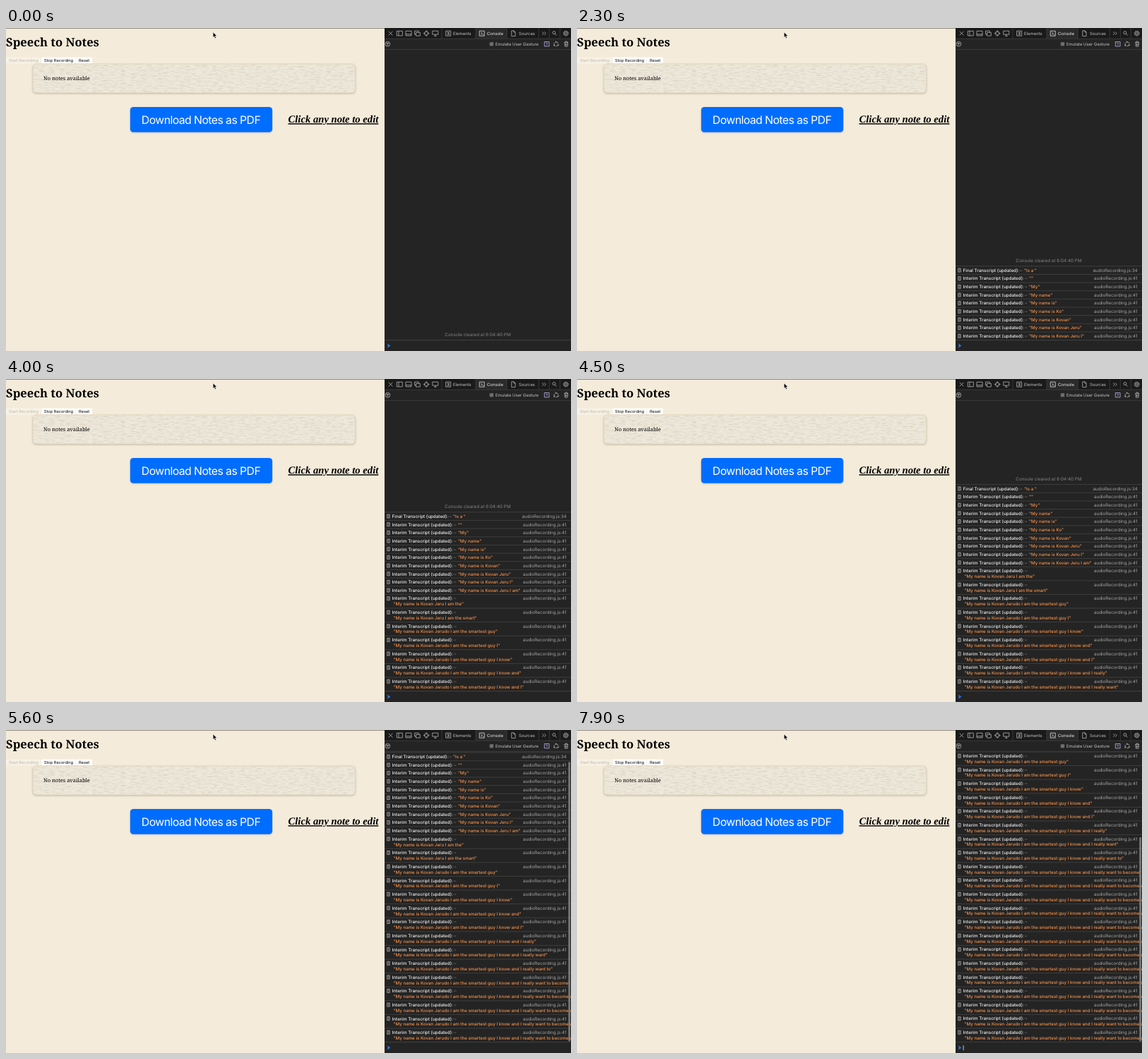
These frames come from a looping animation (800x458 px, 8000 ms). An HTML page:

```html
<!DOCTYPE html>
<html lang="en">
<head>
<meta charset="utf-8">
<title>Speech to Notes</title>
<style>
  html, body { margin: 0; width: 100%; height: 100%; overflow: hidden; background: #f4ebda; }
  svg { display: block; width: 100vw; height: 100vh; }
  text { font-family: Inter, "Liberation Sans", sans-serif; text-rendering: geometricPrecision; white-space: pre; }
  .serif { font-family: "Noto Serif", serif; }
  .hint {
    font: italic bold 14.67px "Liberation Serif", serif;
    text-decoration: underline 1px; text-underline-offset: 1px;
  }
  .btn { font-size: 5.7px; text-anchor: middle; }
  .tab { font-size: 5.95px; fill: #c4c4c4; }
  .row { font-size: 6.3px; fill: #f2f2f2; }
  .label { font-weight: 500; }
  .dash { fill: #999; }
  .value { font-size: 6.18px; font-weight: 500; fill: #f7934a; }
  .file { fill: #a6a6a6; text-anchor: end; }
  .icon { fill: none; stroke: #b4b4b4; stroke-width: .8; }
  .shade { filter: drop-shadow(0 1px 1.5px rgba(70, 60, 40, .35)); }
  .soft { filter: drop-shadow(0 1.2px 1px rgba(0, 0, 0, .16)); }
</style>
</head>
<body>
<svg viewBox="0 0 800 458" preserveAspectRatio="none">
  <defs>
    <filter id="paper" x="0" y="0" width="100%" height="100%">
      <feTurbulence type="fractalNoise" baseFrequency=".13 .55" numOctaves="3" seed="8"/>
      <feColorMatrix values="0 0 0 0 .62  0 0 0 0 .58  0 0 0 0 .48  1.4 0 0 0 -.6"/>
    </filter>
    <clipPath id="sheet"><rect x="38" y="51" width="456.5" height="41" rx="5"/></clipPath>
    <clipPath id="view"><rect x="536" y="31" width="264" height="411.5"/></clipPath>
  </defs>

  <rect width="536" height="458" fill="#f4ebda"/>
  <rect width="536" height=".8" fill="#77736c"/>
  <text class="serif" x="0" y="26" font-size="16.55" font-weight="700">Speech to Notes</text>

  <rect x="0" y="41.6" width="49.5" height="8.6" rx="1" fill="#fff" opacity=".3"/>
  <rect x="50.3" y="41.6" width="48.2" height="8.6" rx="1" fill="#fff"/>
  <rect x="99.4" y="41.6" width="22.6" height="8.6" rx="1" fill="#fff"/>
  <text class="btn" x="24.8" y="48" fill="#bdb8ae">Start Recording</text>
  <text class="btn" x="74.5" y="48">Stop Recording</text>
  <text class="btn" x="110.6" y="48">Reset</text>

  <rect class="shade" x="38" y="51" width="456.5" height="41" rx="5" fill="#eee8db"/>
  <g clip-path="url(#sheet)">
    <rect x="38" y="51" width="457" height="41" filter="url(#paper)"/>
    <g id="fibres" fill="none" stroke-width=".6"></g>
  </g>
  <rect x="38" y="51" width="456.5" height="41" rx="5" fill="none" stroke="#e3d5b8" stroke-width=".8"/>
  <text class="serif" x="53" y="73.7" font-size="7.5">No notes available</text>

  <rect class="soft" x="175.8" y="112" width="201.3" height="35.7" rx="4.5" fill="#006dff"/>
  <text x="276" y="136.2" font-size="15.8" letter-spacing="-.56" fill="#fff" text-anchor="middle">Download Notes as PDF</text>
  <text class="hint" x="399.5" y="134.2">Click any note to edit</text>
  <path d="M293.2 6v7.4l1.7-1.6 1.2 2.9 1.3-.6-1.2-2.8h2.4z" fill="#000" stroke="#fff" stroke-width=".5"/>

  <rect x="536" width="264" height="458" fill="#242424"/>
  <rect x="536" width="264" height="15" fill="#1a1a1a"/>
  <rect x="665" width="44" height="15" fill="#2b2b2b"/>
  <path d="M617 0v15M665 0v15M709.3 0v15M754.3 0v15M769.3 0v15M784.3 0v15M536 15.2h264M536 30.4h264" fill="none" stroke="#414141" stroke-width=".8"/>

  <g class="icon">
    <path d="M541.8 4.8l5.6 5.6m0-5.6l-5.6 5.6"/>
    <path d="M553.3 4.3h8v6.6h-8zM556 4.3v6.6"/>
    <path d="M566 4.3h8v6.6h-8zM566 8.8h8"/>
    <path d="M580.5 6.4h5.8v4.7h-5.8zM580.5 9h-2V4.2h5.8v2.2"/>
    <circle cx="595.2" cy="7.6" r="2.8"/>
    <path d="M595.2 3.2v3m0 2.8v3M590.8 7.6h3m2.8 0h3"/>
    <path d="M603.8 4.2h8v5h-8zM606.2 11.4h3.4M607.8 9.2v2"/>
    <path d="M622.7 4.2h7v7h-7zM624.5 6h1.6v3.4h-1.6M628 6h-1v3.4h1"/>
    <path d="M670.3 4.2h7v7h-7zM672.3 6l2.2 1.7-2.2 1.7M675 9.5h1.2" stroke="#ddd"/>
    <path d="M715.8 3.8h3.3l2 2v5.8h-5.3zM719 3.8v2.1h2"/>
    <path d="M759.3 5.4l2 2.2-2 2.2m3-4.4l2 2.2-2 2.2"/>
    <circle cx="775.9" cy="6.7" r="2"/><path d="M777.4 8.2l2.2 2.3"/>
    <circle cx="792.7" cy="7.6" r="1.2"/><circle cx="792.7" cy="7.6" r="2.8"/>
    <circle cx="792.7" cy="7.6" r="3.5" stroke-dasharray="1.37 1.37"/>
    <circle cx="540.4" cy="22.7" r="3.4"/><path d="M538.3 21.5h4.2M539 22.9h2.8M539.7 24.3h1.4"/>
    <path d="M762.3 19.5h6.8v6.4h-6.8zM764 21.4h2.4M765 24.4l2.6-2.6" stroke="#bdb4ea"/>
    <circle cx="779" cy="22.8" r="3" stroke-dasharray="5 1.28"/>
    <path d="M777.8 18.8l1.5 1-1.3 1.2M782.8 23.5l-1 1.5-1.2-1.2M776 26l-.1-1.8 1.7.1"/>
    <path d="M790.3 20.6h5.8M791.9 20.4v-1.3h2.6v1.3M790.9 20.7l.5 5.4h3.6l.5-5.4M792.5 22v2.8m1.4-2.8v2.8"/>
  </g>
  <text class="tab" x="633" y="9.8">Elements</text>
  <text class="tab" x="681" y="9.8" style="fill:#f0f0f0">Console</text>
  <text class="tab" x="726" y="9.8">Sources</text>
  <rect x="684.7" y="20" width="5.6" height="5.6" rx="1" fill="#636363"/>
  <path d="M686 22.9l1.1 1.2 1.9-2.8" fill="none" stroke="#999" stroke-width=".7"/>
  <text class="tab" x="693" y="24.9">Emulate User Gesture</text>

  <g clip-path="url(#view)">
    <g id="log"></g>
    <rect id="thumb" x="796.2" width="2.8" rx="1.4" fill="#8b8b8b" opacity=".8"/>
  </g>
  <path d="M536 442.6h264" stroke="#454545" stroke-width=".8"/>
  <path d="M540.2 448.1l3.1 2.4-3.1 2.4M540.2 450.5h2.4" fill="none" stroke="#2f7cf0" stroke-width="1.2"/>
  <rect id="caret" x="546.7" y="447.2" width=".8" height="7" fill="#eee"/>
</svg>

<script>
  const LOOP = 8000, BOTTOM = 442.6, VIEW = 411.5;
  const HEAD = 14, SINGLE = 11.66, DOUBLE = 19.6;
  const $ = id => document.getElementById(id);

  function add(parent, tag, attrs, content = '') {
    const el = document.createElementNS('http://www.w3.org/2000/svg', tag);
    for (const key in attrs) el.setAttribute(key, attrs[key]);
    el.textContent = content;
    return parent.appendChild(el);
  }

  // Arrival time of each console row
  const arrivals = [
    400, 500, 700, 900, 1200, 1450, 1700, 1950, 2200, 2400, 2650, 2900,
    3150, 3350, 3550, 3750, 3950, 4200, 4400, 4600, 4800, 5000,
    5200, 5350, 5500, 5650, 5850, 6000, 6150, 6500, 6900, 7300, 7700
  ];

  // Each phrase grows by one word per row
  const grow = (start, words) => words.split(' ').map(w => start += ' ' + w);
  const phrases = [
    'Is a ', '', 'My', 'My name', 'My name is', 'My name is Ko',
    ...grow('My name is', 'Kovan Jeru I am the smart'),
    'My name is Kovan Jerudo I am the smartest guy',
    ...grow('My name is Kovan Jerudo I am the smartest guy', 'I know and I really want to become a')
  ];
  const phraseAt = i => phrases[Math.min(i, phrases.length - 1)];

  const log = $('log');
  const heights = [HEAD];
  add(log, 'text', { x: 668, y: 8.6, 'font-size': 6.35, fill: '#858585', 'text-anchor': 'middle' },
    'Console cleared at 6:04:40 PM');

  arrivals.forEach((_, i) => {
    const top = heights[i], wide = i > 9, final = i === 0;
    const base = top + 8.1;
    const write = (x, y, cls, s) => add(log, 'text', { x, y, class: 'row ' + cls }, s);
    add(log, 'path', { d: `M536 ${top}h264`, stroke: '#444', 'stroke-width': .8 });
    add(log, 'path', {
      d: `M539.8 ${top + 3.3}h3.4v5h-3.4zM541 ${top + 4.8}h1.2M541 ${top + 6.5}h1.2`,
      fill: 'none', stroke: '#c9c9c9', 'stroke-width': .7
    });
    write(546.6, base, 'label', (final ? 'Final' : 'Interim') + ' Transcript (updated):');
    write(final ? 627.3 : 634.2, base, 'dash', '–');
    write(wide ? 548.5 : final ? 633 : 640, wide ? base + 7.8 : base, 'value', `"${phraseAt(i)}"`);
    write(793.6, base, 'file', 'audioRecording.js:' + (final ? 34 : 41));
    heights.push(top + (wide ? DOUBLE : SINGLE));
  });

  // Paper fibres
  let seed = 11;
  const rand = () => (seed = seed * 16807 % 2147483647) / 2147483647;
  const tints = ['#fbf8ef', '#d0c8b5', '#c2bdae', '#d9c8a6'];
  for (let i = 0; i < 240; i++) {
    const x = 36 + rand() * 456, y = 51 + rand() * 41, len = 1.5 + rand() * 6;
    add($('fibres'), 'path', {
      d: `M${x} ${y}q${len / 2} ${rand() * 2 - 1} ${len} ${rand() * 2 - 1}`,
      stroke: tints[i % 4], opacity: .25 + rand() * .35
    });
  }

  function draw(t) {
    const total = heights[arrivals.filter(a => a <= t).length];
    log.setAttribute('transform', `translate(0 ${BOTTOM - total})`);
    const size = Math.min(VIEW, VIEW * 409 / total);
    $('thumb').setAttribute('y', 441.6 - size);
    $('thumb').setAttribute('height', size);
    $('thumb').setAttribute('visibility', total > VIEW ? 'visible' : 'hidden');
    $('caret').setAttribute('visibility', t >= 7600 ? 'visible' : 'hidden');
  }

  const start = performance.now();
  function tick() {
    draw((performance.now() - start) % LOOP);
    requestAnimationFrame(tick);
  }
  tick();
</script>
</body>
</html>
```
